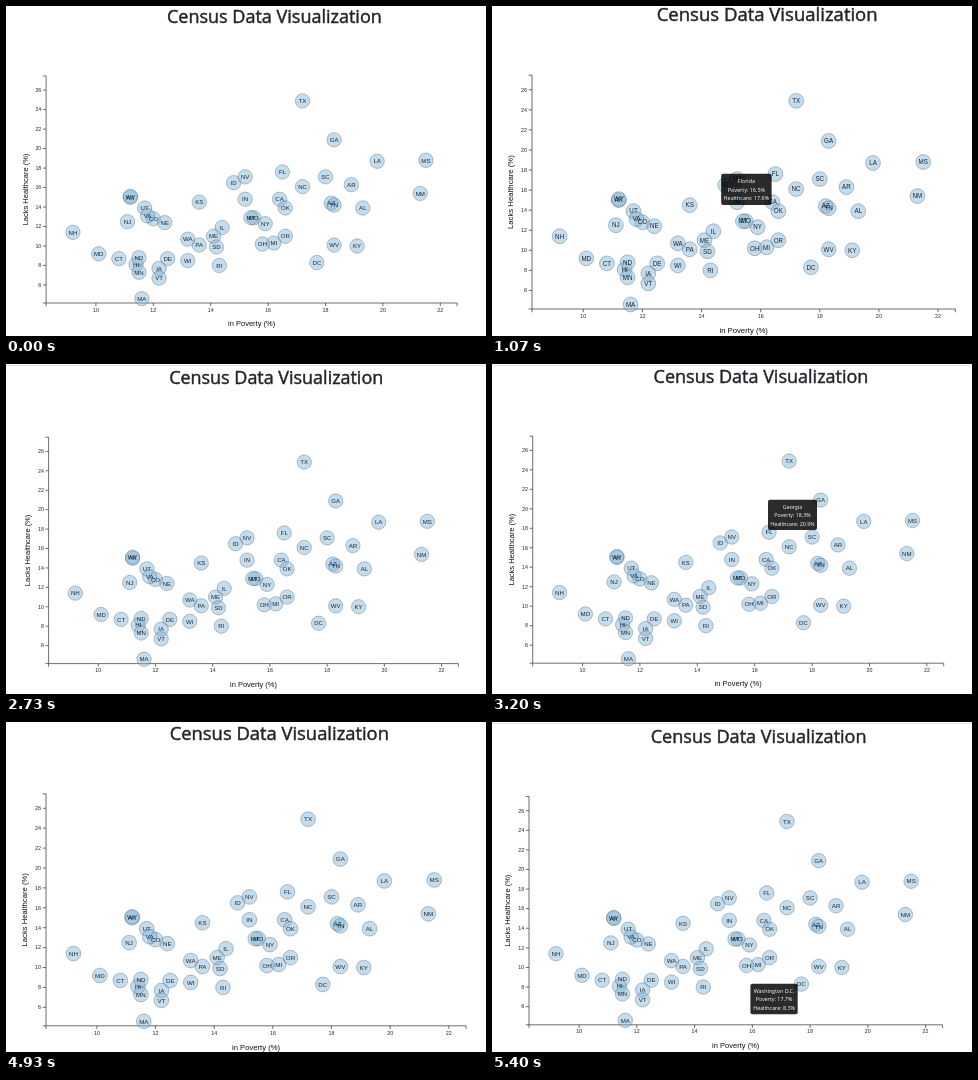
Animation, 480 px wide and 330 px high, one loop 5990 ms. Source, as an HTML page:

```html
<!DOCTYPE html>
<html lang="en">
<head>
<meta charset="utf-8">
<title>Census Data Visualization</title>
<style>
  html, body { margin: 0; width: 100%; height: 100%; overflow: hidden; background: #fff; }
  svg { display: block; width: 480px; height: 330px; }
  text { text-anchor: middle; font-family: "Liberation Sans", Arial, sans-serif; fill: #111; }
  .title { font: 18px "Open Sans", "Noto Sans", sans-serif; fill: #212529; stroke: #212529; stroke-width: .45; }
  .label { font-size: 7.5px; }
  .tick { font-size: 5.3px; fill: #222; }
  .tick.left { text-anchor: end; }
  .axis { fill: none; stroke: #333; stroke-width: .7; }
  .dot { fill: #7fb3d5; fill-opacity: .46; stroke: #33506a; stroke-opacity: .55; stroke-width: .6; }
  .state { font-size: 6.1px; fill: #1c2833; }
  .tip rect { fill: #000; fill-opacity: .83; }
  .tip text { font: 5.3px "Open Sans", "Noto Sans", sans-serif; fill: #fff; }
</style>
</head>
<body>
<svg viewBox="0 0 480 330">
  <path id="topLine" d="M0 1.5H480" stroke="#e2e2e2"/>
  <g id="chart"></g>
</svg>
<script>
const LOOP = 5990;
const WIDTH = 411, HEIGHT = 227;

// state, poverty %, lacking healthcare %
const states = `AL 19.3 13.9,AK 11.2 15,AZ 18.2 14.4,AR 18.9 16.3,CA 16.4 14.8,CO 12 12.8,
CT 10.8 8.7,DE 12.5 8.7,DC 17.7 8.3,FL 16.5 17.6,GA 18.3 20.9,HI 11.4 8.1,ID 14.8 16.5,
IL 14.4 11.9,IN 15.2 14.8,IA 12.2 7.7,KS 13.6 14.5,KY 19.1 10,LA 19.8 18.7,ME 14.1 11,
MD 10.1 9.2,MA 11.6 4.6,MI 16.2 10.3,MN 11.5 7.3,MS 21.5 18.8,MO 15.5 12.9,MT 15.4 12.9,
NE 12.4 12.4,NV 15.2 17.1,NH 9.2 11.4,NJ 11.1 12.5,NM 21.3 15.4,NY 15.9 12.3,NC 17.2 16.1,
ND 11.5 8.8,OH 15.8 10.2,OK 16.6 13.9,OR 16.6 11,PA 13.6 10.1,RI 14.3 8,SC 18 17.1,
SD 14.2 9.9,TN 18.3 14.2,TX 17.2 24.9,UT 11.7 13.9,VT 12.2 6.7,VA 11.8 13.1,WA 13.2 10.7,
WV 18.3 10.1,WI 13.2 8.5,WY 11.2 15.1`.split(',').map(row => {
  const [code, poverty, healthcare] = row.trim().split(' ');
  return { code, poverty: +poverty, healthcare: +healthcare };
});

// Each view holds the chart origin (axis corner), its zoom and an optional tooltip.
const views = [
  { start: 0, x: 40.1, y: 297, zoom: 1 },
  { start: 1000, x: 40, y: 303, zoom: 1.03, tip: 'FL' },
  { start: 2000, x: 42.6, y: 299.6, zoom: .997, line: true },
  { start: 3000, x: 40.7, y: 299.2, zoom: 1, tip: 'GA', line: true },
  { start: 4000, x: 40, y: 303.8, zoom: 1.022 },
  { start: 5000, x: 37, y: 302.8, zoom: 1.006, tip: 'DC', line: true }
];

const chart = document.getElementById('chart');
const topLine = document.getElementById('topLine');
const px = poverty => 49.8 + (poverty - 10) * 28.7;
const py = healthcare => -57 - (healthcare - 10) * 9.74;

function add(parent, tag, attrs, content = '') {
  const node = document.createElementNS('http://www.w3.org/2000/svg', tag);
  for (const key in attrs) node.setAttribute(key, attrs[key]);
  node.textContent = content;
  return parent.appendChild(node);
}

const addText = (parent, cls, x, y, content) => add(parent, 'text', { class: cls, x, y }, content);

function drawAxes() {
  let d = `M-3.2 ${-HEIGHT}H0V0H-3.2M0 3.2V0H${WIDTH}V3.2`;
  for (let v = 10; v <= 22; v += 2) {
    d += `M${px(v)} 0v3.2`;
    addText(chart, 'tick', px(v), 8.6, v);
  }
  for (let v = 6; v <= 26; v += 2) {
    d += `M0 ${py(v)}h-3.2`;
    addText(chart, 'tick left', -4.8, py(v) + 1.8, v);
  }
  add(chart, 'path', { class: 'axis', d });
  addText(chart, 'title', 228.3, -280, 'Census Data Visualization');
  addText(chart, 'label', WIDTH / 2, 23.3, 'in Poverty (%)');
  add(chart, 'text', { class: 'label', transform: `translate(-18.5 ${-HEIGHT / 2}) rotate(-90)` },
    'Lacks Healthcare (%)');
}

function drawStates() {
  for (const s of states)
    add(chart, 'circle', { class: 'dot', cx: px(s.poverty), cy: py(s.healthcare), r: 7.2 });
  for (const s of states)
    addText(chart, 'state', px(s.poverty), py(s.healthcare) + 2.2, s.code);
}

function drawTip(code, name, width) {
  const s = states.find(item => item.code === code);
  const x = px(s.poverty) - 3.7 - width, y = py(s.healthcare) - .3;
  const tip = add(chart, 'g', { class: 'tip' });
  add(tip, 'rect', { x, y, width, height: 30.3, rx: 2 });
  [name, `Poverty: ${s.poverty}%`, `Healthcare: ${s.healthcare}%`]
    .forEach((row, i) => addText(tip, '', x + width / 2, y + 9 + i * 8.4, row));
  return tip;
}

drawAxes();
drawStates();
const tips = {
  FL: drawTip('FL', 'Florida', 49),
  GA: drawTip('GA', 'Georgia', 49),
  DC: drawTip('DC', 'Washington D.C.', 47)
};

function render(now) {
  const time = now % LOOP;
  const view = views.findLast(v => v.start <= time);
  chart.setAttribute('transform', `translate(${view.x} ${view.y}) scale(${view.zoom})`);
  topLine.style.display = view.line ? '' : 'none';
  for (const code in tips) tips[code].style.display = code === view.tip ? '' : 'none';
}

const startTime = performance.now();
function tick() {
  render(performance.now() - startTime);
  requestAnimationFrame(tick);
}
tick();
</script>
</body>
</html>
```
